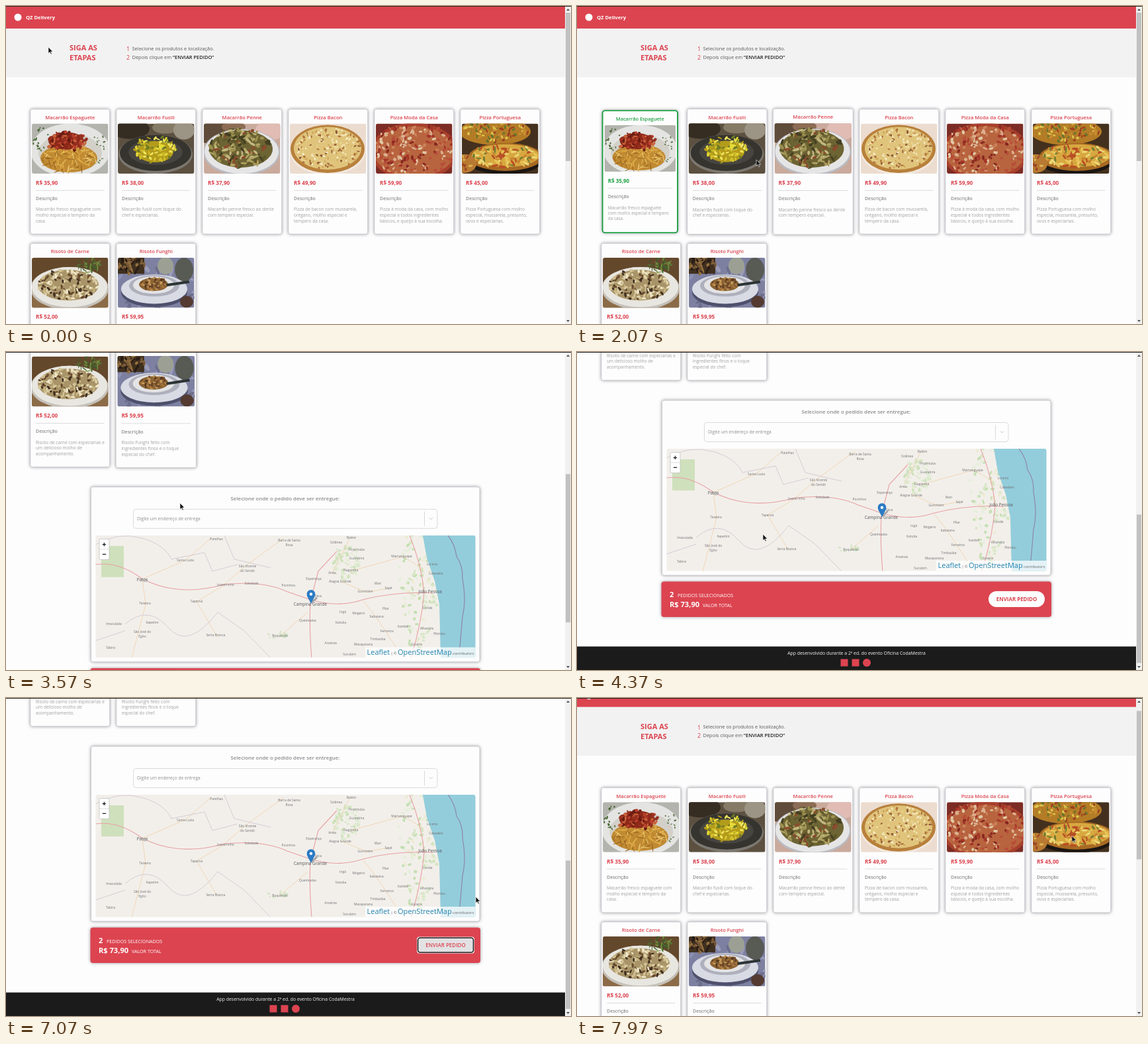
Animation, 854 px wide and 480 px high, one loop 8000 ms. Source, as an HTML page:

```html
<!DOCTYPE html>
<html lang="pt-BR">
<head>
<meta charset="utf-8">
<style>
  html, body { margin: 0; width: 100%; height: 100%; overflow: hidden; background: #fdfdfd; }
  svg { display: block; width: 854px; height: 480px; font-family: "Open Sans", sans-serif; }
  .glow { filter: drop-shadow(0 0 2.5px #9c9ca4); }
</style>
</head>
<body>
<svg id="stage" viewBox="0 0 854 480"></svg>
<script>
const RED = '#dc4450', GREEN = '#21a147', GREY = '#a0a0a4', DARK_GREY = '#8b8b90', PAPER = '#fdfdfd', EDGE = '#c4c4ca';
const LOOP = 8000, BOTTOM = 504;

let seed = 7;
const random = () => (seed = (seed * 16807) % 2147483647) / 2147483647;

// Markup helpers; text is placed by its vertical middle
const rect = (x, y, w, h, fill, r = 0, extra = '') =>
  `<rect x="${x}" y="${y}" width="${w}" height="${h}" rx="${r}" fill="${fill}" ${extra}/>`;
const oval = (x, y, rx, ry, fill, extra = '') =>
  `<ellipse cx="${x}" cy="${y}" rx="${rx}" ry="${ry}" fill="${fill}" ${extra}/>`;
const line = (d, stroke, width = 1, extra = '') =>
  `<path d="${d}" fill="none" stroke="${stroke}" stroke-width="${width}" ${extra}/>`;
const text = (x, y, s, size, fill, weight = 400, anchor = 'start') =>
  `<text x="${x}" y="${y + size * .35}" font-size="${size}" fill="${fill}" font-weight="${weight}" text-anchor="${anchor}">${s}</text>`;

// Seeded scatter of small tilted ovals inside an ellipse
function scatter(n, cx, cy, rx, ry, colors, w, h) {
  let out = '';
  for (let i = 0; i < n; i++) {
    const a = random() * 6.283, d = Math.sqrt(random());
    const x = (cx + Math.cos(a) * rx * d).toFixed(1), y = (cy + Math.sin(a) * ry * d).toFixed(1);
    out += oval(x, y, w * (.6 + random() * .6), h * (.6 + random() * .6), colors[i % colors.length],
      `transform="rotate(${Math.round(random() * 180)} ${x} ${y})"`);
  }
  return out;
}

// Dish pictures, each 115.5 by 75
const back = fill => rect(0, 0, 115.5, 75, fill);
const pictures = [
  () => back('#b4b4ae') + oval(58, 40, 60, 40, '#e4e4e2') + oval(58, 44, 48, 29, '#d2d0c8') +
    scatter(18, 14, 25, 13, 20, ['#4c6a38'], 2.2, 1.1) + scatter(14, 101, 38, 10, 24, ['#587243'], 1.8, 1) +
    oval(56, 52, 43, 21, '#c08a32') + scatter(90, 56, 53, 40, 19, ['#e4b64e', '#99651f', '#d49c3a', '#ecca74'], 7, .7) +
    oval(52, 26, 27, 13, '#8c2818') + scatter(70, 53, 27, 31, 15, ['#b8402c', '#6a1c12', '#c8643c', '#963020'], 3.4, 2),
  () => back('#5c5040') + oval(18, 8, 30, 15, '#352c22') + oval(72, 6, 20, 9, '#857a66') + oval(100, 10, 16, 14, '#9c9484') +
    oval(57, 46, 56, 29, '#7c7870') + oval(57, 44, 54, 27, '#36342f') + oval(57, 43, 41, 19, '#474540') +
    oval(56, 42, 28, 16, '#b39c1c') + scatter(90, 56, 39, 31, 20, ['#e8dc38', '#b79c18', '#f2e65e', '#6f7c24', '#d2c02c'], 3.6, 1.6),
  () => back('#c9aa9c') + oval(10, 10, 26, 20, '#604c3a') + oval(45, 5, 18, 8, '#8c6c54') + oval(100, 10, 22, 15, '#e0bcb4') +
    oval(57, 43, 58, 35, '#b9bac0') + oval(57, 42, 56, 33, '#e6e5e6') + oval(56, 38, 48, 28, '#6d6434') +
    scatter(130, 55, 36, 46, 29, ['#9c9050', '#5c562a', '#c4b880', '#443f22', '#8a4c2c', '#b0a464'], 4.8, 2),
  () => back('#ecdcd0') + oval(57, 41, 57, 36, '#f2e8de') + oval(57, 38, 56, 36, '#b8803c') + oval(57, 37, 51, 32, '#e0c47c') +
    scatter(170, 57, 37, 50, 31, ['#f2e6b4', '#b0743c', '#e6ce88', '#8f5a34', '#f6ecc8', '#cfa45a'], 2.4, 1.4),
  () => back('#7c2c24') + oval(58, 42, 66, 43, '#a8402c') + oval(58, 42, 61, 38, '#b8643f') +
    scatter(190, 57, 39, 64, 40, ['#dcae8c', '#a43428', '#cc845c', '#882820', '#e0c8a4', '#b84c38'], 3.2, 2),
  () => back('#44301e') + oval(50, 12, 54, 20, '#b47c26') + scatter(80, 50, 11, 50, 16, ['#e0c650', '#9c3e22', '#64742c', '#c88c30'], 3.4, 1.7) +
    oval(65, 57, 56, 19, '#1c1612') + oval(66, 50, 56, 21, '#a86a24') + oval(66, 48, 51, 17, '#d8a840') +
    scatter(85, 66, 48, 49, 17, ['#ecd878', '#b84e24', '#707c30', '#e8c458', '#c88430'], 4.6, 1.6) +
    oval(4, 60, 18, 14, '#b87a32') + scatter(12, 4, 59, 15, 10, ['#dcb454', '#9c4426'], 3, 1.5),
  () => back('#64482c') + rect(0, 45, 115.5, 30, '#8c6c48') + oval(57, 46, 59, 32, '#c4c0b8') + oval(57, 44, 57, 30, '#e8e6e0') +
    oval(55, 41, 46, 23, '#a89468') + scatter(150, 55, 40, 45, 23, ['#e0d4ac', '#6a4c30', '#c8b684', '#402e20', '#d4c498', '#f0e6c8'], 3.2, 1.6) +
    scatter(40, 86, 10, 17, 12, ['#4c7234', '#74943f', '#3a5828'], 4.5, .8),
  () => back('#7d80a0') + scatter(40, 57, 50, 70, 36, ['#8c90b4', '#6c6e8c', '#9a9cb8'], 8, 3) + rect(0, 0, 40, 24, '#40301f') +
    scatter(45, 20, 11, 20, 13, ['#785836', '#281c14', '#94703f'], 4, 2) + oval(72, 12, 12, 13, '#9ca094') + oval(100, 18, 14, 18, '#585a54') +
    oval(55, 52, 50, 22, '#4e506c') + oval(55, 47, 50, 22, '#d8dae4') + oval(55, 42, 38, 16, '#aeb0bc') + oval(54, 41, 31, 13, '#e4e4e6') +
    oval(54, 40, 22, 10, '#8c6434') + scatter(60, 54, 39, 22, 10, ['#a8743a', '#543820', '#c89c5c', '#70482a'], 2.6, 1.4) +
    line('M74 41L108 36', '#2c3434', 4) + oval(104, 66, 10, 9, '#543a30'),
].map(draw => draw());

const dishes = [
  ['Macarrão Espaguete', '35,90', 'Macarrão fresco espaguete com|molho especial e tempero da|casa.', 'Macarrão fresco espaguete|com molho especial e tempero|da casa.'],
  ['Macarrão Fusili', '38,00', 'Macarrão fusili com toque do|chef e especiarias.'],
  ['Macarrão Penne', '37,90', 'Macarrão penne fresco ao dente|com tempero especial.'],
  ['Pizza Bacon', '49,90', 'Pizza de bacon com mussarela,|orégano, molho especial e|tempero da casa.'],
  ['Pizza Moda da Casa', '59,90', 'Pizza à moda da casa, com molho|especial e todos ingredientes|básicos, e queijo à sua escolha.'],
  ['Pizza Portuguesa', '45,00', 'Pizza Portuguesa com molho|especial, mussarela, presunto,|ovos e especiarias.'],
  ['Risoto de Carne', '52,00', 'Risoto de carne com especiarias e|um delicioso molho de|acompanhamento.'],
  ['Risoto Funghi', '59,95', 'Risoto Funghi feito com|ingredientes finos e o toque|especial do chef.'],
];

// Cards are drawn around their own centre
function face(i, chosen) {
  const [name, price, plain, wrapped] = dishes[i];
  const accent = chosen ? GREEN : RED;
  const left = chosen ? -50 : -51.8, lift = chosen ? -2.5 : 0;
  const width = chosen ? 111 : 115.5, height = chosen ? 72.5 : 75.5;
  const frame = chosen
    ? rect(-58.5, -95, 117, 190, PAPER, 4, `stroke="${GREEN}" stroke-width="2"`)
    : rect(-60, -94.2, 120, 188.4, PAPER, 3, `stroke="${EDGE}" stroke-width=".8"`);
  const body = (chosen && wrapped || plain).split('|');
  return frame + text(0, -81.7, name, 7.65, accent, 600, 'middle') +
    `<g transform="translate(${-width / 2} -72.5) scale(${width / 115.5} ${height / 75})" clip-path="url(#photo)">${pictures[i]}</g>` +
    text(left, 17 + lift, 'R$ ' + price, 8.2, accent, 700) +
    line(`M${left} ${28.3 + lift}H${-left}`, '#d8d8da', .9) +
    text(left, 40.5 + lift * .8, 'Descrição', 7, DARK_GREY, 600) +
    body.map((s, k) => text(left, 57 + lift * .4 + k * 8.6, s, 6.6, GREY)).join('');
}
const centre = i => [96.8 + (i % 6) * 130, 250 + (i > 5 ? 202.5 : 0)];
const cards = dishes.map((_, i) =>
  `<g id="card${i}" class="glow"><g>${face(i, false)}</g>${i < 2 ? `<g>${face(i, true)}</g>` : ''}</g>`).join('');

const header = rect(0, 0, 845, 34, RED) + oval(18, 17, 5.5, 5.5, '#fff') +
  text(30, 17, 'QZ Delivery', 7.67, '#fff', 700) + rect(0, 34, 845, 73.5, '#f2f2f2') +
  text(96, 63.5, 'SIGA AS', 11.05, RED, 700) + text(96, 78.5, 'ETAPAS', 11.05, RED, 700) +
  text(182, 65, '1', 9, RED) + text(182, 77.5, '2', 9, RED) +
  text(190.5, 64, 'Selecione os produtos e localização.', 7.45, '#58585c') +
  text(190.5, 77, 'Depois clique em <tspan font-weight="600" fill="#1e1e20">“ENVIAR PEDIDO”</tspan>', 7.45, '#58585c');

const towns = [
  ['Parelhas', 318, 152], ['Barra de Santa', 428, 154], ['Rosa', 428, 161], ['Belém', 522, 150], ['Solânea', 499, 157],
  ['Pirpirituba', 530, 168], ['Guarabira', 530, 181], ['Mamanguape', 598, 178], ['Lucena', 644, 190], ['Cabedelo', 650, 204],
  ['Santa Luzia', 271, 184], ['São Vicente', 365, 193], ['do Seridó', 365, 200], ['Juazeirinho', 332, 221], ['Soledade', 371, 219],
  ['Pocinhos', 427, 222], ['Esperança', 465, 212], ['Areia', 493, 203], ['Alagoinha', 521, 199], ['Alagoa Grande', 505, 216],
  ['Gurinhém', 543, 231], ['Mari', 562, 219], ['Sapé', 578, 226], ['Teixeira', 210, 249], ['Taperoá', 288, 246],
  ['Seca', 472, 238], ['Queimadas', 456, 275], ['Ingá', 509, 262], ['Mogeiro', 533, 264], ['Itatuba', 506, 278],
  ['Itabaiana', 560, 269], ['Pilar', 574, 257], ['Conde', 637, 256], ['Itapetim', 221, 278], ['Imaculada', 163, 280],
  ['São José do', 206, 292], ['Egito', 206, 299], ['Serra Branca', 317, 297], ['Boqueirão', 414, 298], ['Aroeiras', 491, 309],
  ['Itambé', 600, 284], ['Ferreiros', 576, 291], ['Timbaúba', 562, 303], ['Macaparana', 540, 311], ['Alhandra', 636, 287],
  ['Pitimbu', 655, 295], ['Goiana', 621, 311], ['Tabira', 158, 316], ['Surubim', 519, 326],
];
const cities = [['Patos', 206, 213], ['Campina Grande', 460, 250], ['João Pessoa', 641, 231]];

const map = `<g clip-path="url(#map)">` + rect(135, 146, 575, 185, '#f2efea') +
  scatter(60, 515, 188, 22, 26, ['#dbe8cc', '#cfe2bc', '#e4ecd8'], 3.5, 2) +
  scatter(120, 622, 228, 30, 95, ['#d6e6c4', '#c6dfb4', '#e6eedc', '#ecebd4'], 3.5, 2) +
  scatter(12, 410, 296, 16, 6, ['#d2e4c4'], 2.5, 1.5) +
  '<path d="M630 146L636 180L648 215L655 250L657 331H710V146Z" fill="#93cddb"/>' +
  rect(144, 162, 34, 47, '#cfe0bc') +
  line('M668 146Q679 160 681 178Q691 192 690 212Q696 244 690 268L686 315', '#8c86ae', 1.2) +
  line('M135 190Q170 185 205 211Q260 240 330 220Q390 214 425 231L460 243Q500 256 540 243Q590 230 645 233M460 246L472 200L500 170M460 248Q458 285 462 331M610 146Q628 190 632 232Q628 280 612 331', '#e8a0a4', 1.1) +
  line('M206 212L211 250L190 331M330 221L288 246L320 300M270 184L206 212M271 184L310 150M330 220L365 190L420 150M414 298L456 262M505 215L545 232L578 226M540 245L560 270L600 331M521 200L600 178L630 196M493 203L520 150', '#f0d0a8', .8) +
  line('M135 160Q170 140 205 150T250 182L300 172L312 200L350 190M180 280Q215 250 245 285T320 262L360 290L400 331M330 146L345 182L400 195M135 305L180 290', '#cfc2d0', .8) +
  oval(210, 214, 4, 3, '#dcd8d4') +
  towns.map(([s, x, y]) => text(x, y, s, 4.9, '#707074', 400, 'middle')).join('') +
  cities.map(([s, x, y]) => text(x, y, s, 6.4, '#55555a', 400, 'middle')).join('') +
  line('M461 248L470 240', '#a4a4a8', 3) +
  '<path d="M461 249L456 239.500Q454.500 237 454.700 234.500A6.300 6.300 0 0 1 467.300 234.500Q467.500 237 466 239.500Z" fill="#2b7bc4"/>' +
  oval(461, 234.7, 2.2, 2.2, '#fff') +
  rect(543, 315, 167, 16, '#fff', 0, 'opacity=".75"') +
  text(545.5, 322.5, 'Leaflet', 11, '#1f82ae') + text(581.5, 324.5, '| ©', 5.6, '#606064') +
  text(592, 322.5, 'OpenStreetMap', 11.05, '#1f82ae') + text(675, 324.5, 'contributors', 5.6, '#606064') + '</g>' +
  rect(141, 151.5, 15, 31, '#fff', 2, 'stroke="#c2c2c2" stroke-width=".8"') + line('M141 167H156', '#ccc', .7) +
  text(148.5, 159, '+', 11, '#111', 700, 'middle') + text(148.5, 174.5, '−', 11, '#111', 700, 'middle');

const order = `<g class="glow">${rect(128.5, 73, 587.5, 264, PAPER, 3, `stroke="${EDGE}" stroke-width=".8"`)}</g>` +
  text(422, 90, 'Selecione onde o pedido deve ser entregue:', 7.88, DARK_GREY, 600, 'middle') +
  rect(192.5, 106.5, 459.5, 29, PAPER, 4, 'stroke="#d2d2d4" stroke-width=".8"') +
  text(198, 121, 'Digite um endereço de entrega', 6.65, '#8e8e92') +
  line('M632.500 110V132', '#d0d0d2', .8) + line('M640 119.500L642.500 122L645 119.500', '#c4c4c6', 1) + map +
  `<g class="glow">${rect(127.5, 346.5, 589.5, 53.5, RED, 4)}</g>` +
  text(140, 366, '2', 11.1, '#fff', 700) + text(152, 367.3, 'PEDIDOS SELECIONADOS', 7.15, '#fff') +
  text(140, 381, 'R$ 73,90', 11.1, '#fff', 700) + text(190, 382.3, 'VALOR TOTAL', 7.15, '#fff') +
  `<g id="idle">${rect(622, 361, 85, 24, PAPER, 12)}${text(664.5, 373.3, 'ENVIAR PEDIDO', 7.93, RED, 700, 'middle')}</g>` +
  `<g id="pressed">${rect(621, 360.5, 87, 25, '#fff', 4)}${rect(622.5, 362, 84, 22, '#e2e2e4', 3.5, 'stroke="#1c1c1e" stroke-width="1.6"')}${text(664.5, 373.3, 'ENVIAR PEDIDO', 8, RED, 600, 'middle')}</g>` +
  rect(0, 444.5, 845, 36, '#1b1b1b') +
  text(422.5, 454.5, 'App desenvolvido durante a 2ª ed. do evento Oficina CodaMestra', 6.9, '#f6f6f6', 400, 'middle') +
  rect(398.5, 463.5, 11, 11, RED) + rect(415.5, 463.5, 11, 11, RED) + oval(438, 469, 6, 6, RED);

const scrollbar = rect(845, 0, 9, 480, '#f1f1f1') + rect(846, 10, 7, 224, '#c1c1c1', 0, 'id="thumb"') +
  '<path d="M847 7L849.500 4L852 7ZM847 474L849.500 477L852 474Z" fill="#505050"/>';

const $ = id => document.getElementById(id);
$('stage').innerHTML =
  `<defs><clipPath id="photo">${rect(0, 0, 115.5, 75, '#000', 3)}</clipPath><clipPath id="map">${rect(135.5, 146, 574, 184.5, '#000', 3)}</clipPath></defs>` +
  rect(0, 0, 854, 480, PAPER) +
  `<g id="page">${header}${cards}<g transform="translate(0 ${BOTTOM})">${order}</g></g>` +
  scrollbar + rect(0, 0, 854, 1, '#2a2420') +
  '<path id="cursor" d="M0 0V9.500L2.200 7.500L3.900 11L5.300 10.300L3.700 7H6.700Z" fill="#111" stroke="#fff" stroke-width=".6"/>';

const clamp = v => Math.max(0, Math.min(1, v));
const smooth = v => v * v * (3 - 2 * v);

// Interpolates rows of [time, ...values]
function track(rows, t, ease = v => v) {
  const k = rows.findIndex(row => row[0] > t);
  if (k < 0) return rows[rows.length - 1].slice(1);
  if (k === 0) return rows[0].slice(1);
  const a = rows[k - 1], b = rows[k], p = ease((t - a[0]) / (b[0] - a[0]));
  return a.slice(1).map((v, n) => v + (b[n + 1] - v) * p);
}

const pointer = [[0, 64, 62], [150, 64, 62], [780, 104, 218], [1180, 106, 222], [1660, 650, 236], [1780, 650, 236],
  [2070, 271, 232], [2450, 260, 228], [3400, 260, 228], [3570, 263, 228], [4200, 263, 228], [4370, 281, 275],
  [5100, 655, 375], [6570, 655, 375], [6630, 657, 377], [6800, 657, 377], [7070, 710, 300], [7350, 748, 208]];
const scrolling = [[2560, 0], [3030, 199], [3570, 373], [4150, BOTTOM], [7280, BOTTOM], [7620, 250], [7970, 20.5], [8000, 14]];
const hovers = [[0, 600, 1230], [1, 1230, 1340], [2, 1340, 1460], [3, 1460, 1580], [4, 1580, 1860], [3, 1860, 1930],
  [2, 1930, 2020], [1, 2020, 2250], [7, 2930, 3700]];
const picked = [[0, 1000], [1, 2250]];

function render(t) {
  const [scroll] = track(scrolling, t);
  const [x, y] = track(pointer, t, smooth);
  $('page').setAttribute('transform', `translate(0 ${-scroll})`);
  $('thumb').setAttribute('y', 10 + scroll * .467);
  $('cursor').setAttribute('transform', `translate(${x} ${y})`);

  dishes.forEach((_, i) => {
    const pick = picked.find(([card]) => card === i);
    const chosen = !!pick && t >= pick[1] && t < 7450;
    const hover = Math.max(0, ...hovers.filter(h => h[0] === i)
      .map(([, start, end]) => Math.min(clamp((t - start) / 150), clamp((end + 150 - t) / 150))));
    const size = !chosen ? 1 + .012 * hover : i === 0 ? 1 - .03 * clamp((t - 1230) / 200) : 1;
    const [cx, cy] = centre(i), card = $('card' + i);
    card.setAttribute('transform', `translate(${cx - (chosen ? 1.5 : 0)} ${cy}) scale(${size})`);
    if (pick) {
      card.children[0].style.display = chosen ? 'none' : '';
      card.children[1].style.display = chosen ? '' : 'none';
    }
  });

  const pressed = t >= 5400;
  $('idle').style.display = pressed ? 'none' : '';
  $('pressed').style.display = pressed ? '' : 'none';
}

const start = performance.now();
function tick() {
  render((performance.now() - start) % LOOP);
  requestAnimationFrame(tick);
}
tick();
</script>
</body>
</html>
```
